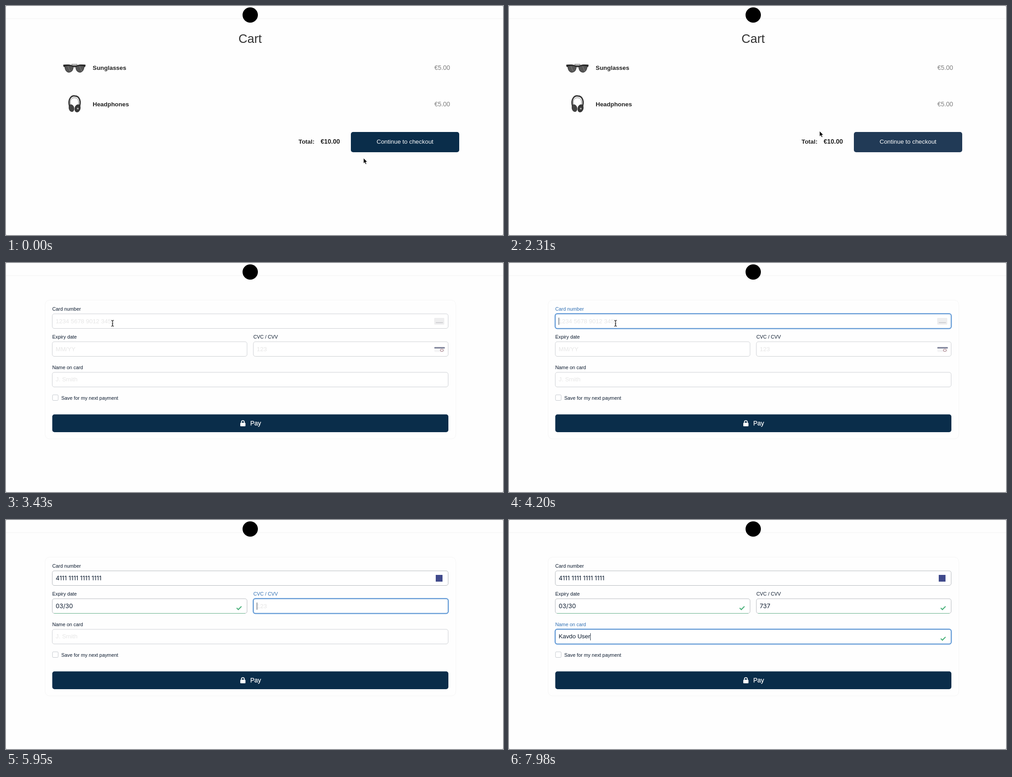
Recreate the animation shown at these times as an HTML page. Size 1101x509 px, loop 8 s.

```html
<!DOCTYPE html>
<html lang="en">
<head>
<meta charset="utf-8">
<title>Checkout</title>
<style>
  html, body { margin: 0; width: 100%; height: 100%; overflow: hidden; background: #aaa; }
  svg { display: block; width: 1101px; height: 509px; }
  text { font: 13.4px "Liberation Sans", Arial, sans-serif; fill: #0b1a2e; white-space: pre; }
  .bold { font-weight: bold; fill: #222; }
  .price { font-size: 13.9px; fill: #808080; }
  .label { font-size: 10.85px; }
  .digits { font-family: Inter, "Liberation Sans", sans-serif; }
  .hint { fill: #e6e6e6; }
  .light { fill: #fff; }
</style>
</head>
<body>
<svg viewBox="0 0 1101 509">
  <rect width="1101" height="509" rx="2" fill="#fefefe"/>
  <path d="M0 28H1101" stroke="#f2f2f2"/>
  <circle cx="541" cy="20" r="17" fill="#000"/>

  <g id="cart">
    <text x="515" y="82" style="font-size:27.3px;fill:#333">Cart</text>
    <g>
      <path d="M145 129.7H158M127 131Q138 129 149 132.5H154.500Q165 129 176 131L175 135H128Z" fill="#222" stroke="#333"/>
      <path d="M130 134Q139 131 149 135Q149 147 139 147.500Q131 147 130 134ZM173.500 134Q164 131 154.500 135Q154.500 147 164 147.500Q172 147 173.500 134Z" fill="#555" stroke="#333"/>
      <path d="M149 138Q152 134 155 138" fill="none" stroke="#777"/>
      <path d="M137 134L142 145M163 134L168 145" stroke="#6c6c6c" stroke-width="2"/>
    </g>
    <g fill="none" stroke="#333">
      <path d="M141 224C136 205 146 199 152.500 200C163 200 167 212 162 226" stroke-width="3"/>
      <path d="M143 219C140 207 148 203 153 204C160 205 162 212 160 221" stroke="#777"/>
      <ellipse cx="145" cy="227" rx="5.500" ry="8" fill="#444" transform="rotate(-15 145 227)"/>
      <ellipse cx="158.500" cy="227.500" rx="6" ry="8.500" fill="#383838" transform="rotate(15 158.500 227.500)"/>
      <circle cx="159" cy="228" r="2" fill="#aaa" stroke="none"/>
    </g>
    <text class="bold" x="192" y="141.500">Sunglasses</text>
    <text class="bold" x="192" y="222.500">Headphones</text>
    <text class="price" x="949" y="141.500">€5.00</text>
    <text class="price" x="949" y="222.500">€5.00</text>
    <text class="bold" x="648" y="306">Total:</text>
    <text class="bold" x="697" y="306" style="font-size:14px">€10.00</text>
    <rect id="checkout" x="764" y="280" width="240" height="45" rx="5"/>
    <text class="light" x="821" y="306">Continue to checkout</text>
  </g>

  <g id="payment">
    <rect x="86.500" y="82.500" width="910" height="308.500" rx="10" fill="none" stroke="#f5f5f5"/>
    <g id="form">
      <rect x="103" y="293" width="12.500" height="12.500" rx="2" fill="#fff" stroke="#c4c8ce"/>
      <text class="label" x="122.500" y="303.700">Save for my next payment</text>
    </g>
    <rect x="102.500" y="336.500" width="877.500" height="39.500" rx="5" fill="#0a2d4a"/>
    <path d="M521.500 356V353.500a3.200 3.200 0 0 1 6.400 0V356" fill="none" stroke="#fff" stroke-width="1.800"/>
    <rect x="519" y="355" width="11.500" height="8" rx="1.500" fill="#fff"/>
    <text class="light" x="541" y="360.500" style="font-size:14px;stroke:#fff;stroke-width:.25px">Pay</text>
  </g>

  <g id="ring" fill="none">
    <circle id="outer" stroke="#111"/>
    <circle id="inner" stroke="#fff" stroke-width="1.800" stroke-opacity=".75"/>
  </g>
  <g id="cursor">
    <path id="arrow" d="M0 0V12L2.700 9.600L4.700 14L6.700 13.100L4.800 8.800H8.500Z" fill="#000" stroke="#fff" stroke-width=".8"/>
    <path id="hand" d="M-1.300 1Q0-.8 1.300 1V5.500Q3-.2 4 6Q5.500 5 6 6.800Q7.500 6 7.600 8Q7.800 12 5.800 14H-.8Q-2.500 11-4.200 8.300Q-3.500 6.700-1.300 8.800Z" fill="#fff" stroke="#111" stroke-width=".9"/>
    <path id="beam" d="M-3-6.500Q0-6.500 0-4.500Q0-6.500 3-6.500M0-4.500V4.500M-3 6.500Q0 6.500 0 4.500Q0 6.500 3 6.500M-1.500 1.500H1.500" fill="none" stroke="#111" stroke-width="1.200"/>
  </g>
</svg>
<script>
const LOOP = 8000, STEP = 70, PAGE_SWAP = 2590;
const CLICKS = [980, 3710];
const PATH = [[280, 792, 338], [630, 850, 306], [2030, 850, 306], [2310, 688, 278],
              [3010, 396, 233], [3430, 236, 134]];
const FIELDS = [
  { x: 102.5, y: 113, w: 877, label: "Card number", labelY: 106, hint: "1234 5678 9012 3456",
    value: "4111 1111 1111 1111", digits: true, focus: 3780, blur: 5250, from: 4340, to: 5180 },
  { x: 102.5, y: 175, w: 431.5, label: "Expiry date", labelY: 168, hint: "MM/YY",
    value: "03/30", digits: true, focus: 5250, blur: 5880, from: 5390, to: 5740, valid: 5880 },
  { x: 548, y: 175, w: 431.5, label: "CVC / CVV", labelY: 168, hint: "123",
    value: "737", digits: true, focus: 5880, blur: 6860, from: 6300, to: 6580, valid: 6860 },
  { x: 102.5, y: 243, w: 877, label: "Name on card", labelY: 236.3, hint: "J. Smith",
    value: "Kavdo User", focus: 6860, blur: LOOP, from: 7070, to: 7910, valid: 7140 }
];

const $ = id => document.getElementById(id);
const clamp = v => Math.max(0, Math.min(1, v));
const mix = (a, b, k) => a + (b - a) * k;
const set = (node, attrs) => { for (const k in attrs) node.setAttribute(k, attrs[k]); };
const show = (node, on) => { node.style.display = on ? "" : "none"; };

function add(tag, attrs, text = "", parent = $("form")) {
  const node = document.createElementNS("http://www.w3.org/2000/svg", tag);
  set(node, attrs);
  node.textContent = text;
  return parent.appendChild(node);
}

for (const f of FIELDS) {
  const box = { x: f.x, y: f.y, width: f.w, height: 32.5, rx: 4.5 };
  const base = f.y + 20.8 - (f.y === 243 ? .8 : 0);
  f.labelNode = add("text", { class: "label", x: f.x, y: f.labelY }, f.label);
  f.glow = add("rect", { ...box, fill: "none", stroke: "#b9d5f3", "stroke-width": 4 });
  f.box = add("rect", { ...box, fill: "#fff" });
  f.hintNode = add("text", { class: "hint", x: f.x + 7.5, y: base }, f.hint);
  f.text = add("text", { class: f.digits ? "digits" : "", x: f.x + 7.5, y: base });
  f.caret = add("path", { stroke: "#234" });
  f.good = add("g", {});
  const right = f.x + f.w;
  f.underline = add("path", { d: `M${f.x + 4} ${f.y + 32.5}H${right - 4}`, stroke: "#5fae85" }, "", f.good);
  add("path", { d: `M${right - 23} ${f.y + 20.5}l3.6 3.6l7-7.2`, fill: "none",
    stroke: "#4cb27c", "stroke-width": 2.2 }, "", f.good);
}

const blankCard = add("g", {});
add("rect", { x: 948.5, y: 122, width: 22.5, height: 15, rx: 2, fill: "#eeeeef" }, "", blankCard);
add("path", { d: "M952 132.500H968", stroke: "#c5c5c8", "stroke-width": 1.5 }, "", blankCard);
const brand = add("rect", { x: 952, y: 122, width: 15, height: 15, fill: "#404a8b" });
const codeIcon = add("g", {});
add("rect", { x: 949, y: 185, width: 22.5, height: 13, rx: 2, fill: "#f5f5f6" }, "", codeIcon);
add("path", { d: "M949 188.500H972", stroke: "#7d8299", "stroke-width": 3 }, "", codeIcon);
add("ellipse", { cx: 965.5, cy: 194, rx: 3.5, ry: 2.5, fill: "#fff", stroke: "#95606c" }, "", codeIcon);

function pointer(t) {
  let [, x, y] = PATH[0];
  for (let i = 1; i < PATH.length; i++) {
    const [t0, x0, y0] = PATH[i - 1], [t1, x1, y1] = PATH[i];
    if (t >= t0) {
      const k = clamp((t - t0) / (t1 - t0));
      x = mix(x0, x1, k);
      y = mix(y0, y1, k);
    }
  }
  return [x, y];
}

function typed(f, t) {
  if (t < f.from) return "";
  const k = clamp((t - f.from) / (f.to - f.from));
  return f.value.slice(0, 1 + Math.floor(k * (f.value.length - 1)));
}

function drawField(f, t) {
  const focused = t >= f.focus && t < f.blur;
  const value = typed(f, t);
  set(f.labelNode, { style: focused ? "fill:#2f6fb3" : "" });
  set(f.box, { stroke: focused ? "#3f80c8" : value ? "#b4b8bd" : "#cccfd3", "stroke-width": focused ? 1.5 : 1 });
  show(f.glow, focused);
  show(f.hintNode, !value);
  f.text.textContent = value;
  show(f.caret, focused);
  if (focused) {
    const x = f.x + 8 + (value ? f.text.getComputedTextLength() : 0);
    set(f.caret, { d: `M${x} ${f.y + 8.5}v16` });
  }
  show(f.good, t >= f.valid);
  show(f.underline, !focused);
}

function drawPointer(t) {
  const [x, y] = pointer(t);
  const overButton = t < PAGE_SWAP && x >= 764 && x <= 1004 && y >= 280 && y <= 325;
  const overField = t > 3080 && FIELDS.some(f =>
    x >= f.x && x <= f.x + f.w && y >= f.y && y <= f.y + 33);
  set($("cursor"), { transform: `translate(${x} ${y})` });
  show($("cursor"), t < FIELDS[0].from);
  show($("hand"), overButton);
  show($("beam"), overField);
  show($("arrow"), !overButton && !overField);

  const start = CLICKS.find(c => t >= c && t < c + 350);
  show($("ring"), start !== undefined);
  if (start === undefined) return;
  const age = t - start, r = mix(12, 25.5, clamp(age / 180));
  set($("outer"), { cx: x, cy: y, r });
  set($("inner"), { cx: x, cy: y, r: r - 1.2 });
  set($("ring"), { opacity: 1 - clamp((age - 210) / 140) });
}

function draw(now) {
  const t = Math.floor(now % LOOP / STEP) * STEP;
  const hover = clamp((t - 910) / 210);
  const mixed = [[10, 33], [45, 58], [74, 86]].map(([a, b]) => Math.round(mix(a, b, hover)));
  set($("checkout"), { fill: `rgb(${mixed})` });
  show($("cart"), t < PAGE_SWAP);
  show($("payment"), t >= PAGE_SWAP);
  set($("form"), { opacity: clamp((t - 2940) / 490) });
  FIELDS.forEach(f => drawField(f, t));
  show(blankCard, t < FIELDS[0].from);
  show(brand, t >= FIELDS[0].from);
  show(codeIcon, t < FIELDS[2].focus);
  drawPointer(t);
  requestAnimationFrame(draw);
}
requestAnimationFrame(draw);
</script>
</body>
</html>
```
